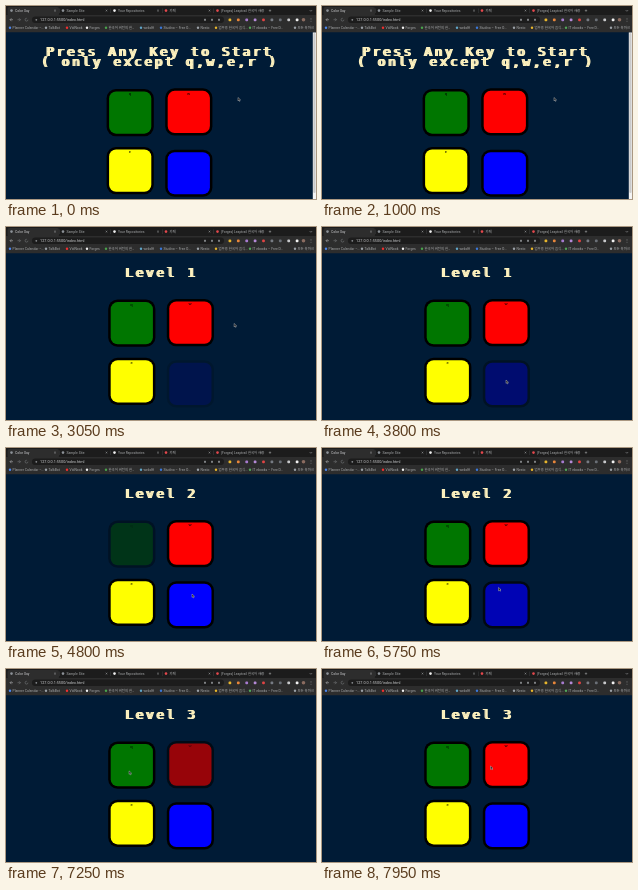
Write an HTML page with a canvas that moves like this. It is 310 by 193 pixels and loops after 8 s.

```html
<!DOCTYPE html>
<html lang="en">
<head>
<meta charset="utf-8">
<title>Color Say</title>
<style>
  html, body { margin: 0; width: 100%; height: 100%; overflow: hidden; background: #001b36; }
  canvas { display: block; width: 310px; height: 193px; }
</style>
</head>
<body>
<canvas id="stage"></canvas>
<script>
const WIDTH = 310, HEIGHT = 193, LOOP = 8000, FADE = 400;
const PAGE = '#001b36', CREAM = '#fef2bf', BAR = '#2d2d2d', DARK = '#1c1c1c', LABEL = '#a9abad';
const UI_FONT = 'Roboto, "Noto Sans CJK KR", "Noto Sans CJK", sans-serif';

const canvas = document.getElementById('stage');
const ctx = canvas.getContext('2d');
const ratio = window.devicePixelRatio || 1;
canvas.width = WIDTH * ratio;
canvas.height = HEIGHT * ratio;

// Headings from a given time on
const screens = [
  { from: 0, lines: ['Press Any Key to Start', '( only except q,w,e,r )'], start: true },
  { from: 2750, lines: ['Level 1'] },
  { from: 4560, lines: ['Level 2'] },
  { from: 7075, lines: ['Level 3'] },
];

// Position on the level screens; flashes are start times of a fade out and in
const buttons = [
  { color: '#007600', x: 102.2, y: 72.6, key: 'q', flashes: [4560, 6075] },
  { color: '#ff0000', x: 160.8, y: 72, key: 'w', flashes: [7075] },
  { color: '#ffff00', x: 102.2, y: 130.7, key: 'e', flashes: [] },
  { color: '#0000ff', x: 160.8, y: 133.3, key: '', flashes: [2750, 3560, 5600] },
];

// The pointer moves to each place between two times
const moves = [
  { from: 2950, to: 3500, x: 184, y: 153 },
  { from: 3900, to: 4500, x: 186, y: 146 },
  { from: 5650, to: 6050, x: 122.5, y: 102 },
  { from: 7200, to: 7900, x: 168.5, y: 97 },
];

const tabs = [
  [3, 'Color Say', '#8d9298'],
  [54.5, 'Sample Site', '#8d9298'],
  [106, 'Your Repositories', '#f1f1f1'],
  [157.5, '카페', '#e5484d'],
  [209, '[Forges] Leaptrail 한국어 사용', '#e5484d'],
];

const bookmarks = [
  [3, 'Planner Calendar –…', '#4c86ee'],
  [39, 'TalkBot', '#9aa0a6'],
  [60, 'VidNook', '#f03030'],
  [80, 'Forges', '#f1f1f1'],
  [99, '한국어 버전의 한…', '#49a34c'],
  [134, 'webdff', '#60a5c8'],
  [154, 'Studivo – Free O…', '#3b78d8'],
  [191, 'Nesto', '#9aa0a6'],
  [209, '업무용 한국어 음식…', '#e8b62c'],
  [243, 'IT ebooks – Free D…', '#52a65a'],
  [288, '모든 북마크', '#9aa0a6'],
];

const extensions = ['#e8b62c', '#e8863a', '#a77bd0', '#b58ad8', '#e04444', '#777c84', '#6b7077', '#c9cacc', '#f2f2f2'];

function rect(x, y, w, h, color, radius = 0) {
  ctx.fillStyle = color;
  ctx.beginPath();
  ctx.roundRect(x, y, w, h, radius);
  ctx.fill();
}

const dot = (x, y, r, color) => rect(x - r, y - r, 2 * r, 2 * r, color, r);

function line(points, color, width = 0.6) {
  ctx.strokeStyle = color;
  ctx.lineWidth = width;
  ctx.beginPath();
  points.forEach(([x, y]) => ctx.lineTo(x, y));
  ctx.stroke();
}

function label(text, x, y, color = LABEL, size = 3.4) {
  ctx.font = `${size}px ${UI_FONT}`;
  ctx.fillStyle = color;
  ctx.fillText(text, x, y);
}

function cross(x, y, r) {
  line([[x - r, y - r], [x + r, y + r]], LABEL, 0.5);
  line([[x + r, y - r], [x - r, y + r]], LABEL, 0.5);
}

function drawBrowser() {
  rect(0, 0, WIDTH, 9, DARK);
  rect(0, 9, WIDTH, 17.3, BAR);
  rect(1.5, 1, 51.5, 9, BAR, 2);

  tabs.forEach(([x, title, color], i) => {
    dot(x + 2.5, 4.6, 1.3, color);
    label(title, x + 6, 5.8, i ? LABEL : '#cfd0d2');
    cross(x + 46, 4.6, 0.8);
    if (i) rect(x - 1.5, 2.5, 0.4, 4.5, '#48494b');
  });
  line([[264, 3.4], [264, 5.8]], LABEL, 0.5);
  line([[262.8, 4.6], [265.2, 4.6]], LABEL, 0.5);
  line([[303.6, 4], [304.9, 5.3], [306.2, 4]], LABEL, 0.5);

  line([[5.5, 12.2], [4, 13.7], [5.5, 15.2]], LABEL);
  line([[4, 13.7], [7, 13.7]], LABEL);
  line([[13, 12.2], [14.5, 13.7], [13, 15.2]], '#757779');
  line([[11.5, 13.7], [14.5, 13.7]], '#757779');
  ctx.beginPath();
  ctx.arc(20.5, 13.7, 1.4, 0, 5);
  ctx.stroke();

  rect(26, 10.6, 192, 6.4, DARK, 3.2);
  dot(30.3, 13.8, 0.9, '#8b8e92');
  label('127.0.0.1:5500/index.html', 34, 15.1, '#cfd0d2', 3.8);
  [198, 205, 212].forEach(x => rect(x, 12.8, 2, 2, '#85888b', 0.5));
  extensions.forEach((color, i) => rect(222.5 + i * 8.4, 12.4, 2.8, 2.8, color, 1));
  dot(297.5, 13.8, 1.8, '#8b6c60');
  [12.3, 13.8, 15.3].forEach(y => dot(305, y, 0.4, LABEL));

  bookmarks.forEach(([x, title, color]) => {
    dot(x + 1, 21.8, 1.2, color);
    label(title, x + 3.5, 23);
  });
}

function drawScrollbar() {
  rect(306.8, 26.3, 3.2, 166.7, '#f4f4f4');
  rect(307.3, 27, 2.2, 160, '#c9c9c9', 1.1);
}

// Wide, square-celled lettering: thin strokes widened sideways only
function drawHeading(lines, center) {
  const cell = 10.33, lineHeight = 10;
  ctx.font = '12.6px "DejaVu Sans Mono", monospace';
  ctx.fillStyle = CREAM;
  lines.forEach((text, row) => {
    const left = center - text.length * cell / 2;
    [...text].forEach((char, i) => {
      for (const shift of [0, 0.7, 1.4, 2.1])
        ctx.fillText(char, left + i * cell + shift - 0.4, 50.2 + row * lineHeight);
    });
  });
}

const swing = p => 0.5 - Math.cos(p * Math.PI) / 2;

function opacityAt(flashes, time) {
  const start = flashes.find(t => time >= t && time < t + 2 * FADE);
  return start === undefined ? 1 : swing(Math.abs(time - start - FADE) / FADE);
}

function drawButton({ color, x, y, key, flashes }, time) {
  const size = 47.2, border = 2.5;
  ctx.globalAlpha = opacityAt(flashes, time);
  rect(x, y, size, size, '#000', 9.4);
  rect(x + border, y + border, size - 2 * border, size - 2 * border, color, 7);
  ctx.textAlign = 'center';
  label(key, x + size / 2 - 0.3, y + 6.2, '#000', 4.2);
  ctx.textAlign = 'left';
  ctx.globalAlpha = 1;
}

function drawPointer(time) {
  let x = 232, y = 91.5;
  for (const move of moves) {
    const p = swing(Math.min(1, Math.max(0, (time - move.from) / (move.to - move.from))));
    x += (move.x - x) * p;
    y += (move.y - y) * p;
  }
  ctx.beginPath();
  [[0, 0], [0, 3.4], [0.9, 2.7], [1.5, 3.9], [2, 3.6], [1.5, 2.4], [2.5, 2.3]]
    .forEach(([dx, dy]) => ctx.lineTo(x + dx, y + dy));
  ctx.closePath();
  ctx.fillStyle = '#111';
  ctx.strokeStyle = '#b4b8bc';
  ctx.lineWidth = 0.5;
  ctx.fill();
  ctx.stroke();
}

function draw(now) {
  const time = now % LOOP;
  const screen = screens.findLast(s => time >= s.from);
  ctx.setTransform(ratio, 0, 0, ratio, 0, 0);
  rect(0, 0, WIDTH, HEIGHT, PAGE);
  drawHeading(screen.lines, screen.start ? 153.4 : 155);

  ctx.save();
  if (screen.start) ctx.translate(-1.6, 10.33);
  buttons.forEach(button => drawButton(button, time));
  ctx.restore();

  if (screen.start) drawScrollbar();
  drawBrowser();
  drawPointer(time);
  requestAnimationFrame(() => draw(performance.now()));
}

draw(0);
</script>
</body>
</html>
```
